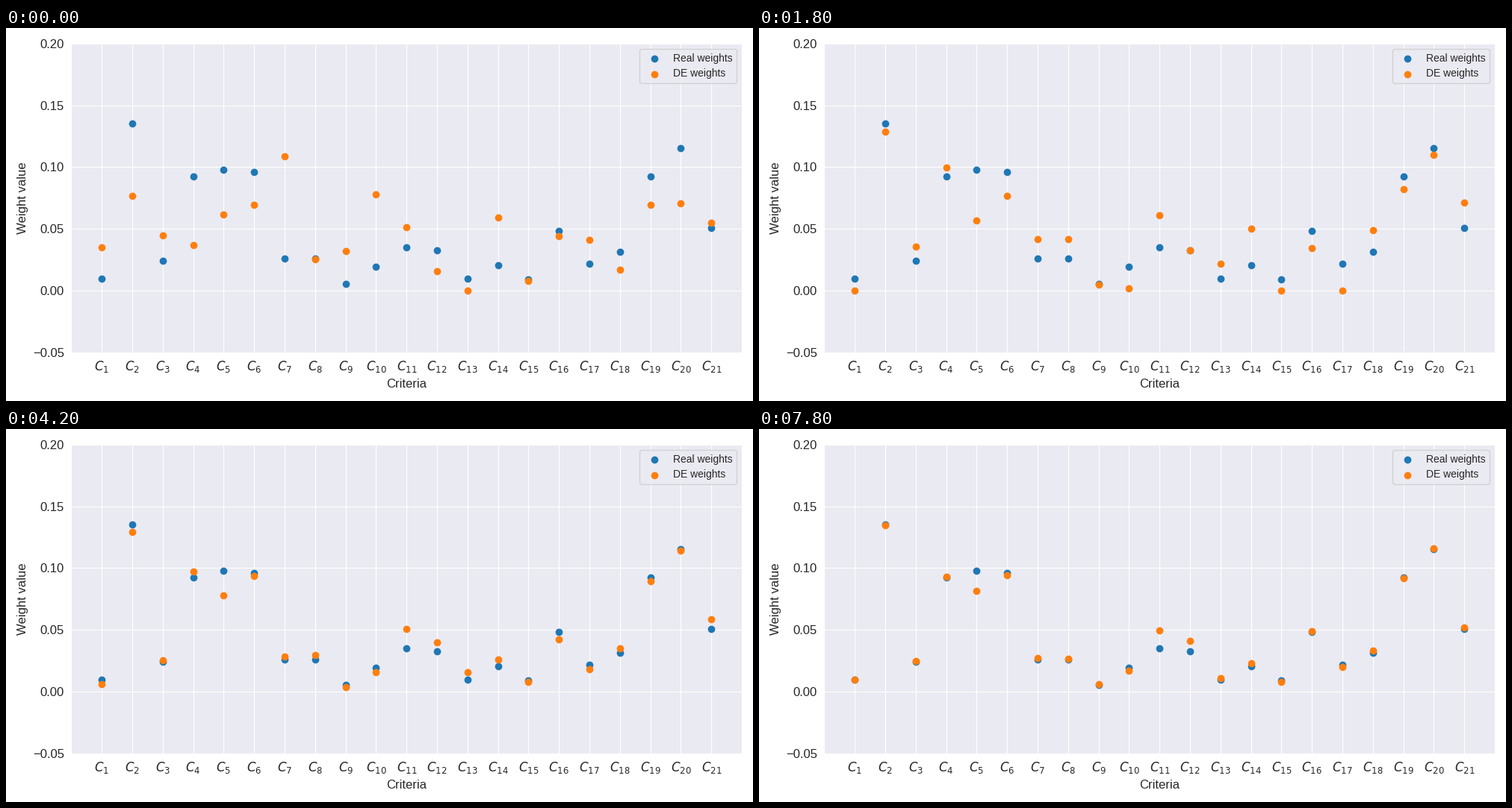
Recreate the animation shown at these times as a matplotlib script. Size 1000 by 500 pixels, loop 8 s.

```python
import numpy as np
import matplotlib.pyplot as plt
from matplotlib.animation import FuncAnimation

plt.rcParams.update({
    "font.family": "Liberation Sans",
    "mathtext.fontset": "dejavusans",
    "text.color": ".15",
    "axes.facecolor": "#EAEAF2",
    "axes.edgecolor": "white",
    "axes.labelcolor": ".15",
    "axes.labelsize": 12,
    "axes.axisbelow": True,
    "axes.grid": True,
    "grid.color": "white",
    "xtick.color": ".15",
    "ytick.color": ".15",
    "xtick.labelsize": 12,
    "ytick.labelsize": 12,
    "xtick.bottom": False,
    "ytick.left": False,
    "legend.fontsize": 10,
})

FRAMES, TICK_MS = 40, 200
SEARCH_STEPS = 9   # wide moves before the search closes in
HALF_LIFE = 5      # steps in which the remaining gap halves

# Weights in ten-thousandths
REAL = np.array([98, 1355, 243, 925, 980, 960, 260, 260, 55, 193, 350,
                 327, 97, 205, 90, 485, 217, 315, 925, 1155, 508])
START = np.array([352, 768, 448, 370, 617, 695, 1088, 255, 320, 780, 515,
                  158, 0, 593, 80, 443, 413, 170, 695, 708, 550])
EARLY = np.array([0, 1288, 358, 997, 568, 768, 417, 417, 50, 20, 610,
                  328, 218, 502, 0, 345, 0, 490, 822, 1100, 713])

# Three criteria settle beside their real weight
goal = REAL.copy()
goal[[4, 10, 11]] += [-145, 128, 90]

# The best solution stays the same on these ticks
HELD = [0, 10, 12, 22, 24, 25, 28, 31, 33, 34, 36]
step_at = np.cumsum([tick not in HELD for tick in range(FRAMES)])

n = len(REAL)
x = np.arange(n)
rng = np.random.default_rng(4)
wobble = rng.normal(0, 100, (FRAMES, n))


def weights(step):
    """Best weights after a number of improvements."""
    if step <= SEARCH_STEPS:
        ease = np.sin(np.pi / 2 * step / SEARCH_STEPS)
        w = START + (EARLY - START) * ease
    else:
        gap = 0.5 ** ((step - SEARCH_STEPS) / HALF_LIFE)
        w = goal + (EARLY - goal) * gap + wobble[step] * gap * (1 - gap)
    return np.maximum(w, 0) / 1e4


fig, ax = plt.subplots(figsize=(10, 5), dpi=100)
fig.subplots_adjust(left=0.08745, right=0.985, top=0.958, bottom=0.1308)

ax.scatter(x, REAL / 1e4, color="#1f77b4", label="Real weights")
found = ax.scatter(x, weights(0), color="#ff7f0e", label="DE weights")
ax.set_xlim(-1, n)
ax.set_ylim(-0.05, 0.20)
ax.set_xticks(x, [f"$C_{{{i + 1}}}$" for i in x])
ax.set_yticks(np.linspace(-0.05, 0.20, 6))
ax.set_xlabel("Criteria")
ax.set_ylabel("Weight value")
ax.legend(loc="upper right")


def update(tick):
    found.set_offsets(np.column_stack([x, weights(step_at[tick])]))
    return (found,)


anim = FuncAnimation(fig, update, frames=FRAMES, interval=TICK_MS, repeat=True)

plt.show()
```
